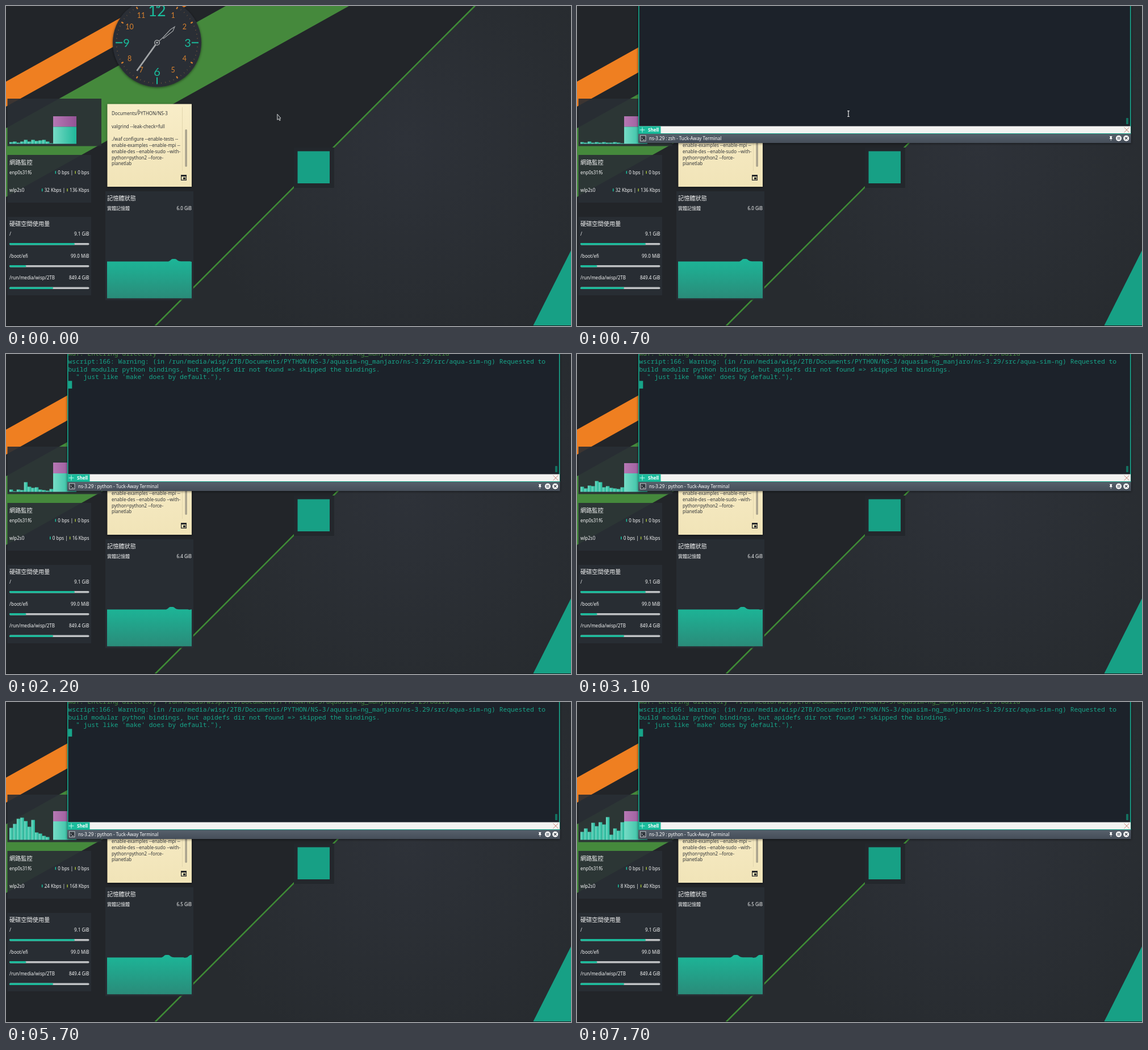
An HTML page that plays this animation: 995x563 px, repeating every 8000 ms.

```html
<!DOCTYPE html>
<html lang="zh-Hant">
<head>
<meta charset="utf-8">
<title>Desktop with terminal</title>
<style>
  html, body { margin: 0; width: 100%; height: 100%; overflow: hidden; background: #222529; }
  svg { display: block; width: 995px; height: 563px; }
  text { font: 8px "Noto Sans", "Noto Sans CJK TC", "Noto Sans CJK", sans-serif; fill: #f4f5f5; white-space: pre; }
  .head { font-size: 10.2px; }
  .end { text-anchor: end; }
  .note text { fill: #33363a; }
  .panel { fill: #2a2e35; fill-opacity: .9; }
  .dial text { font-family: Lato, sans-serif; text-anchor: middle; }
  .term text { font: 11.3px "Noto Sans Mono", monospace; fill: #17a589; }
  .term .ui { font: 8px "Noto Sans", sans-serif; fill: #fff; }
</style>
</head>
<body>
<svg viewBox="0 0 995 563" xmlns="http://www.w3.org/2000/svg">
  <defs>
    <radialGradient id="slate" gradientUnits="userSpaceOnUse" cx="705" cy="240" r="400">
      <stop offset="0" stop-color="#2e3239"/><stop offset="1" stop-color="#272b2f"/>
    </radialGradient>
    <linearGradient id="teal"><stop offset="0" stop-color="#76dbc5"/><stop offset="1" stop-color="#1fb799"/></linearGradient>
    <linearGradient id="plum"><stop offset="0" stop-color="#b678b4"/><stop offset="1" stop-color="#935395"/></linearGradient>
    <linearGradient id="area" x2="0" y2="1"><stop offset="0" stop-color="#1cb698"/><stop offset="1" stop-color="#2a8b79"/></linearGradient>
    <linearGradient id="paper" x2="0" y2="1"><stop offset="0" stop-color="#f8edc8"/><stop offset="1" stop-color="#f1e4b8"/></linearGradient>
    <linearGradient id="bar" x2="0" y2="1"><stop offset="0" stop-color="#56606b"/><stop offset="1" stop-color="#464e59"/></linearGradient>
    <filter id="shadow" x="-20%" y="-20%" width="140%" height="140%">
      <feDropShadow dx="0" dy="1" stdDeviation="2" flood-color="#000" flood-opacity=".55"/>
    </filter>
    <clipPath id="graphBox"><rect x="178" y="430" width="149" height="84.5"/></clipPath>
    <clipPath id="termBox"><rect x="109" y="0" width="865" height="212"/></clipPath>
  </defs>

  <!-- wallpaper -->
  <rect width="995" height="563" fill="#222529"/>
  <path d="M826 0H995V563H262Z" fill="url(#slate)"/>
  <path d="M0 133L239 0H318L0 177Z" fill="#ef7f21"/>
  <path d="M0 215L387 0H604L0 336Z" fill="#45893c"/>
  <path d="M826 -.5L262.500 563" stroke="#3f8c36" stroke-width="2.6"/>
  <path d="M995 430V563H928Z" fill="#17a085"/>
  <rect y="562" width="995" height="1" fill="#1b1e22"/>
  <rect x="507" y="249" width="71" height="71" fill="#23272c"/>
  <rect x="513.500" y="255.500" width="56.500" height="56.500" fill="#17a085"/>

  <g class="dial" id="dial">
    <circle cx="266" cy="64.500" r="78" fill="#2a2f36" filter="url(#shadow)"/>
  </g>

  <rect class="panel" x="2.500" y="163" width="165.500" height="83.500"/>
  <g id="loads"></g>

  <rect class="panel" x="2.500" y="262" width="147.500" height="84"/>
  <text class="head" x="6" y="278.500">網路監控</text>
  <text x="6" y="295.700">enp0s31f6</text>
  <text x="6" y="326.700">wlp2s0</text>
  <g id="wired"></g>
  <g id="wireless"></g>

  <rect class="panel" x="2.500" y="371" width="147.500" height="138"/>
  <text class="head" x="6" y="387.200">硬碟空間使用量</text>
  <g id="disks"></g>

  <rect class="panel" x="175" y="326" width="155" height="191.500"/>
  <text class="head" x="178" y="341.800">記憶體狀態</text>
  <text x="178" y="359.200">實體記憶體</text>
  <text class="end" id="memory" x="327" y="359"></text>
  <g clip-path="url(#graphBox)">
    <path id="graph" fill="url(#area)" d="M170 514.500V449.500H286Q289 448.500 291 446Q292 445 294 445H298Q300 445 302 447.500Q304 449.200 308 449.200H324L327 450L331 449.200L335 446Q336 445 338 445H350V514.500Z"/>
  </g>

  <g class="note" id="note">
    <rect x="178.500" y="172.500" width="148.500" height="145.500" fill="url(#paper)" filter="url(#shadow)"/>
    <path d="M310.500 178V290" stroke="#e2d6ae"/>
    <rect x="315.300" y="217" width="3.600" height="66" rx="1.800" fill="#aaa38d"/>
    <path d="M231.500 183.300H235" stroke="#33363a" stroke-width=".8"/>
    <path d="M308.600 297.600H317.400V306.400H308.600Z" fill="none" stroke="#25282b" stroke-width="1.200"/>
    <path d="M309 298H317V300H309ZM312 301.500H316V305H312Z" fill="#25282b"/>
  </g>

  <g class="term" id="terminal">
    <rect x="108" y="-5" width="867.500" height="246" fill="#1f2329" filter="url(#shadow)"/>
    <path d="M108.800 0V225M974.700 0V225" stroke="#17b295" stroke-width="1.500"/>
    <rect x="967" y="197" width="4" height="11" rx="1" fill="#13705f"/>
    <g id="output" clip-path="url(#termBox)"></g>
    <rect id="block" x="109.500" width="6.800" height="13.500" fill="#17a589"/>
    <rect x="109" y="211.500" width="866" height="12.500" fill="#f3f3f1"/>
    <rect x="109" y="211.500" width="38.500" height="12.500" fill="#1abc9c"/>
    <path d="M110.500 218H119.500M115 213.500V222.500" stroke="#d9fff6" stroke-width=".9"/>
    <text class="ui" x="125" y="221" style="font-weight:700">Shell</text>
    <path d="M963.500 213.500L972.500 222.500M972.500 213.500L963.500 222.500" stroke="#c98274" stroke-width=".9"/>
    <rect x="108" y="224" width="867.500" height="1.300" fill="#17a88c"/>
    <rect x="108" y="225" width="867.500" height="16" fill="url(#bar)"/>
    <rect x="111.500" y="228" width="9.500" height="9.500" fill="#30363d" stroke="#d6d9dc" stroke-width=".9"/>
    <path d="M113.300 231L115.300 232.800L113.300 234.600M116 235.500H119" fill="none" stroke="#e9ebec" stroke-width=".8"/>
    <text class="ui" id="title" x="127" y="235.500"></text>
    <path d="M938 229H942.500V229.800H941.700V232.500L943 234H937.500L938.800 232.500V229.800H938ZM939.900 234H940.600V237H939.900Z" fill="#fff"/>
    <circle cx="954" cy="232.700" r="5" fill="#fff"/>
    <path d="M951.300 231H956.700M951.300 232.700H956.700M951.300 234.400H956.700" stroke="#4b5460" stroke-width=".9"/>
    <circle cx="967.200" cy="232.700" r="5" fill="#fff"/>
    <path d="M965 230.500L969.400 234.900M969.400 230.500L965 234.900" stroke="#3d444d" stroke-width="1.300"/>
  </g>

  <path id="arrow" d="M477.800 190.300V200.300L480 198.500L481.800 201.600L483.200 200.800L481.800 197.900L483.800 197.300Z" fill="#2b2f33" stroke="#e4e6e7" stroke-width=".9"/>
  <path id="beam" d="M476.200 184.700H479.800M478 184.700V194.500M476.200 194.500H479.800" fill="none" stroke="#e9ebec" stroke-width="1.200"/>
</svg>
<script>
const LOOP = 8000;
const USER = "wisp";
const APP = "Tuck-Away Terminal";
const $ = id => document.getElementById(id);

function add(parent, tag, attrs, content = "") {
  const node = document.createElementNS("http://www.w3.org/2000/svg", tag);
  for (const key in attrs) node.setAttribute(key, attrs[key]);
  node.textContent = content;
  parent.append(node);
  return node;
}
const show = (id, visible) => { $(id).style.display = visible ? "" : "none"; };

function drawDial() {
  const dial = $("dial"), cx = 266, cy = 64.5;
  const at = (minute, r) => {
    const a = minute * Math.PI / 30;
    return [cx + r * Math.sin(a), cy - r * Math.cos(a)];
  };
  for (let m = 0; m < 60; m++) {
    const quarter = m % 15 === 0, hour = m % 5 === 0;
    const [x1, y1] = at(m, quarter ? 61 : hour ? 68.5 : 70.5);
    const [x2, y2] = at(m, quarter ? 73 : 72.5);
    add(dial, "line", { x1, y1, x2, y2,
      stroke: quarter ? "#1abc9c" : hour ? "#dc8430" : "#84613f",
      "stroke-width": quarter ? 2 : hour ? 2.2 : 0.8 });
  }
  for (let h = 1; h <= 12; h++) {
    const quarter = h % 3 === 0;
    const [x, y] = at(h * 5, quarter ? (h === 12 ? 56.5 : h === 6 ? 51.5 : 54) : 56);
    const size = h === 12 ? 27 : quarter ? 20 : 12.5;
    add(dial, "text", { x, y: y + size * 0.36,
      style: `font-size:${size}px;fill:${quarter ? "#1abc9c" : "#d9822f"}` }, h);
  }
  const grey = { fill: "none", stroke: "#a3a6a8" };
  add(dial, "path", { ...grey, d: "M263.500 68L230.500 114", "stroke-width": 2.8 });
  add(dial, "path", { ...grey, d: "M269 62L276 56M276 56L289.500 41.500L297 36.500L294 44L277.500 57Z", "stroke-width": 1.2 });
  add(dial, "circle", { ...grey, cx, cy, r: 4.3, "stroke-width": 1.6 });
  add(dial, "circle", { cx, cy, r: 1.8, fill: "#a3a6a8" });
}

function drawDisks() {
  const rows = [["/", "9.1 GiB", 403.5, 115], ["/boot/efi", "99.0 MiB", 442.5, 29.5],
    [`/run/media/${USER}/2TB`, "849.4 GiB", 481, 77]];
  for (const [path, size, y, used] of rows) {
    add($("disks"), "text", { x: 6, y }, path);
    add($("disks"), "text", { x: 146.5, y, class: "end" }, size);
    const line = { x: 6, y: y + 13.5, height: 3.6, rx: 1.8 };
    add($("disks"), "rect", { ...line, width: 140.5, fill: "#bfc2c4" });
    add($("disks"), "rect", { ...line, width: used, fill: "#1abc9c" });
  }
}

function drawNote() {
  const lines = [[192, "Documents/PYTHON/NS-3"], [214.5, "valgrind --leak-check=full"],
    [237, "./waf configure --enable-tests --"], [248, "enable-examples --enable-mpi --"],
    [258.7, "enable-des --enable-sudo --with-"], [269.5, "python=python2 --force-"], [280.2, "planetlab"]];
  for (const [y, line] of lines) add($("note"), "text", { x: 186, y }, line);
}

function drawOutput() {
  const root = `/run/media/${USER}/2TB/Documents/PYTHON/NS-3/aquasim-ng_manjaro/ns-3.29`;
  const lines = [`Waf: Entering directory \`${root}/build'`,
    `wscript:166: Warning: (in ${root}/src/aqua-sim-ng) Requested to`,
    "build modular python bindings, but apidefs dir not found => skipped the bindings.",
    "  \" just like 'make' does by default.\"),"];
  lines.forEach((line, i) =>
    add($("output"), "text", { x: 109.5, y: 3.4 + i * 13.6, style: i ? "" : "fill:#438b3b" }, line));
}

// Rates are laid out from the right edge: value, arrow, divider, value, arrow.
function drawRates(id, y, down, up) {
  const group = $(id);
  group.replaceChildren();
  let x = 146.5;
  for (const [label, color] of [[up, "#9bb437"], [`${down} |`, "#1abc9c"]]) {
    const text = add(group, "text", { x, y, class: "end" }, label);
    x -= text.getComputedTextLength() + 4.8;
    add(group, "rect", { x, y: y - 5.5, width: 1.6, height: 5, fill: color });
    x -= 3.2;
  }
}

function drawLoads(cores, [swapTop, memTop]) {
  const group = $("loads"), base = 242.5, step = 77 / 12;
  group.replaceChildren();
  const bar = (x, top, width, bottom, fill) =>
    add(group, "rect", { x, y: top, width, height: bottom - top, fill: `url(#${fill})` });
  cores.forEach((h, i) => bar(6 + i * step, base - h, step, base, "teal"));
  bar(83, swapTop, 41, memTop, "plum");
  bar(83, memTop, 41, base, "teal");
}

const loads = [
  [0, [3, 4, 2, 4, 7, 4, 7, 5, 6, 7, 4, 1], [194, 212.5]],
  [500, [3, 2, 4, 2, 3, 2, 3, 2, 2, 3, 2, 1], [194, 212.5]],
  [1600, [4, 1, 4, 3, 17, 9, 7, 8, 4, 3, 2, 5], [191, 210]],
  [3100, [9, 6, 11, 10, 19, 17, 8, 10, 7, 6, 5, 8], [192, 210]],
  [3800, [14, 12, 17, 20, 22, 27, 8, 12, 10, 9, 8, 10], [192, 210]],
  [4600, [18, 20, 27, 65, 28, 25, 21, 13, 11, 8, 7, 5], [192, 210]],
  [5700, [21, 28, 37, 39, 33, 23, 35, 13, 11, 7, 5, 0], [192, 210]],
  [6600, [18, 24, 26, 35, 29, 58, 31, 27, 10, 14, 11, 16], [192, 210]],
  [7700, [14, 20, 14, 30, 24, 31, 27, 40, 9, 20, 16, 31], [192, 210]]
];
const meters = [
  [0, "32 Kbps", "136 Kbps", "6.0 GiB"],
  [1600, "0 bps", "16 Kbps", "6.4 GiB"],
  [3800, "16 Kbps", "392 Kbps", "6.5 GiB"],
  [5700, "24 Kbps", "168 Kbps", "6.5 GiB"],
  [7700, "8 Kbps", "40 Kbps", "6.5 GiB"]
];
const windows = [[0, "arrow"], [500, "beam"], [700, "open"], [1300, "typing"], [2000, "started"], [2200, "output"]];

const stepAt = (table, t) => table.findLastIndex(row => row[0] <= t);

function setMeters(i) {
  const [, down, up, memory] = meters[i];
  drawRates("wireless", 326.7, down, up);
  $("memory").textContent = memory;
  $("graph").setAttribute("transform", `translate(${-4 * i})`);
}

function setWindow(i) {
  show("arrow", i === 0);
  show("beam", i === 1 || i === 2);
  show("terminal", i >= 2);
  show("block", i >= 4);
  show("output", i >= 5);
  $("block").setAttribute("y", i >= 5 ? 47.3 : -7);
  $("title").textContent = `ns-3.29 : ${i >= 4 ? "python" : "zsh"} - ${APP}`;
}

const tracks = [
  { table: loads, apply: i => drawLoads(loads[i][1], loads[i][2]) },
  { table: meters, apply: setMeters },
  { table: windows, apply: setWindow }
];

function render(now) {
  const t = now % LOOP;
  for (const track of tracks) {
    const i = stepAt(track.table, t);
    if (i !== track.current) track.apply(track.current = i);
  }
}

drawDial();
drawDisks();
drawNote();
drawOutput();
drawRates("wired", 295.7, "0 bps", "0 bps");

const start = performance.now();
function tick() {
  render(performance.now() - start);
  requestAnimationFrame(tick);
}
tick();
</script>
</body>
</html>
```
